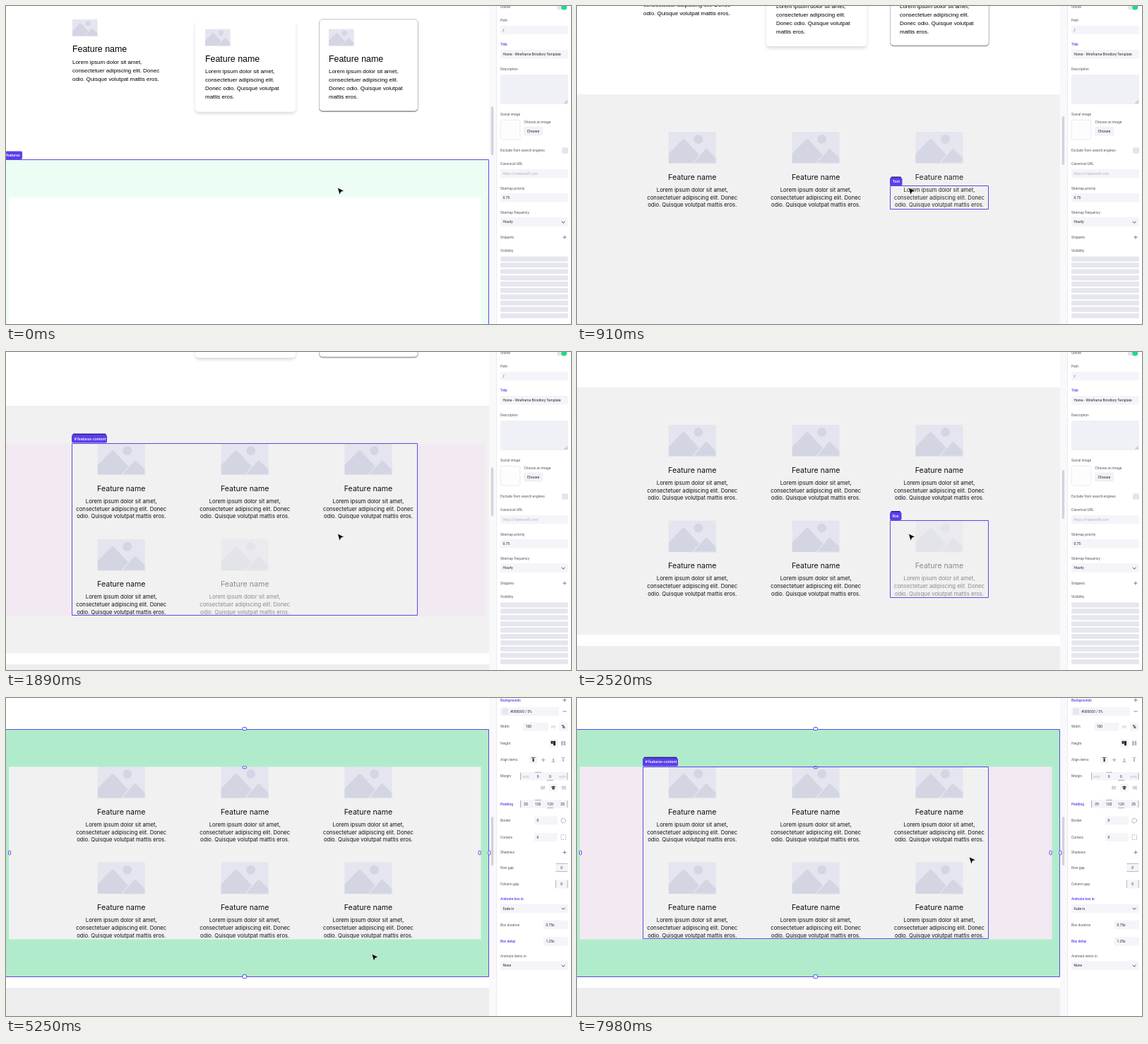
Recreate the animation shown at these times as an HTML page. Size 800 by 450 pixels, loop 8000 ms.

```html
<!DOCTYPE html>
<html lang="en">
<head>
<meta charset="utf-8">
<title>Page builder</title>
<style>
  html, body { margin: 0; width: 100%; height: 100%; overflow: hidden; background: #fff; }
  svg { display: block; width: 100vw; height: 100vh; }
  text { white-space: pre; }
  .ui { font-family: Roboto, sans-serif; }
  .card { font-family: "Liberation Sans", Arial, sans-serif; }
  .geo { font-family: Inter, sans-serif; }
</style>
</head>
<body>
<svg id="stage" viewBox="0 0 800 450" xmlns="http://www.w3.org/2000/svg"></svg>
<script>
const LOOP = 8000;
const PURPLE = '#5a3fea';
const FIELD = '#f4f4f9';
const INK = '#26262e';
const LABEL = '#565661';

const rect = (x, y, w, h, fill, extra = '') =>
  `<rect x="${x}" y="${y}" width="${w}" height="${h}" fill="${fill}" ${extra}/>`;
const line = (d, color = INK, w = 0.8) =>
  `<path d="${d}" fill="none" stroke="${color}" stroke-width="${w}"/>`;
// y is the optical middle of the line
const text = (x, y, str, size, fill, extra = '') =>
  `<text x="${x}" y="${y + size * 0.36}" font-size="${size}" fill="${fill}" ${extra}>${str}</text>`;
const MID = 'text-anchor="middle"';

// ---------- page ----------
const picture = (x, y, w) => `<g transform="translate(${x} ${y}) scale(${w / 67})">
  ${rect(0, 0, 67, 44.5, '#e4e5ee')}
  <circle cx="42" cy="10.5" r="6.4" fill="#d3d5e3"/>
  <path d="M0 31 L19.5 11 Q21.3 9.4 23.1 11 L54 44.5 H0Z" fill="#d3d5e3"/>
  <path d="M34 44.5 L51 24.6 Q53 22.6 55 24.6 L67 36.5 V44.5Z" fill="#d3d5e3" stroke="#e4e5ee" stroke-width="1.4"/>
</g>`;

const LINES = ['Lorem ipsum dolor sit amet,', 'consectetuer adipiscing elit. Donec', 'odio. Quisque volutpat mattis eros.'];
const CARD_LINES = ['Lorem ipsum dolor sit amet,', 'consectetuer adipiscing elit.', 'Donec odio. Quisque volutpat', 'mattis eros.'];

const card = (x, y, lines) => `<g class="card">${picture(x, y, 35.5)}
  ${text(x, y + 42, 'Feature name', 12.4, '#000')}
  ${lines.map((s, i) => text(x, y + 59.8 + i * 12, s, 7.97, '#000')).join('')}</g>`;

const COLS = [163.3, 338.2, 513];
const ROWS = [53, 188.6];
const ITEM_H = 109.6;

const item = i => {
  const cx = COLS[i % 3], y = ROWS[i / 3 | 0];
  return `<g id="item${i}" class="geo">${picture(cx - 33.5, y, 67)}
    ${text(cx, y + 64, 'Feature name', 10.6, '#111', MID)}
    ${LINES.map((s, k) => text(cx, y + 82 + k * 10.8, s, 7.7, '#111', MID)).join('')}</g>`;
};

const page = `<g id="page">
  ${card(94, -198.5, LINES)}
  ${rect(268, -198, 142, 130, '#fff', 'rx="5" filter="url(#soft)"')}
  ${card(282, -184.8, CARD_LINES)}
  ${rect(443.4, -198.7, 140, 129.6, '#fff', 'rx="5" stroke="#b4b4b8" stroke-width=".8" filter="url(#hard)"')}
  ${card(457, -184.8, CARD_LINES)}
  <g id="section">${rect(-7, 0, 691, 350, '#f1f1f1')}${[0, 1, 2, 3, 4, 5].map(item).join('')}</g>
  ${rect(0, 366, 684, 400, '#eeeeee')}
</g>`;

// ---------- side panels ----------
const label = (y, s, on) => text(700, y, s, 4.9, on ? PURPLE : LABEL, on ? 'font-weight="500"' : '');
const field = (x, y, w, h = 12.4, s = '', fill = INK) =>
  rect(x, y, w, h, FIELD, 'rx="1.5"') + (s ? text(x + 3.4, y + h / 2, s, 4.95, fill) : '');
const plus = y => line(`M788.4 ${y}h5.2M791 ${y - 2.6}v5.2`, '#55555f', 0.7);
const chevron = y => line(`M786.8 ${y - 1}l2.4 2.4l2.4 -2.4`, '#33333c', 0.9);

const pagePanel = `
  ${label(1.2, 'Online')}
  ${rect(780, -2.5, 14.5, 8, '#e4e4ee', 'rx="4"')}<circle cx="790.2" cy="1.6" r="4" fill="#1fdc84"/>
  ${label(20.4, 'Path')}${field(700, 28, 96, 12, '/')}
  ${label(54.7, 'Title', true)}${field(700, 62, 96, 12.4, 'Home - Wireframe Brindlory Template')}
  ${label(89, 'Description')}${rect(700, 97, 96, 42, '#f0f0f7', 'rx="1.5"')}
  ${line('M790.5 138l4.5 -4.5M793 138l2 -2', '#666', 0.6)}
  ${label(153.3, 'Social image')}
  ${rect(700.3, 161.3, 27.6, 27.6, '#fdfdfe', 'rx="2.5" stroke="#d6d6e0" stroke-width=".8" stroke-dasharray="1.5 1"')}
  ${text(733.5, 164, 'Choose an image', 4.9, LABEL)}
  ${rect(733, 170.5, 27, 13, '#f1f1f8', 'rx="2"')}${text(746.5, 177, 'Choose', 5.2, INK, MID)}
  ${label(204.4, 'Exclude from search engines')}${rect(787, 200.2, 9, 8.6, '#e4e4ee', 'rx="1.5"')}
  ${label(223.3, 'Canonical URL')}${field(700, 231, 96, 12.2, 'https://makeswift.com', '#b4b4bf')}
  ${label(257.8, 'Sitemap priority')}${field(700, 265, 96, 12.6, '0.75')}
  ${label(292, 'Sitemap frequency')}${field(700, 299.3, 96, 12.4, 'Hourly')}${chevron(305.8)}
  ${label(327, 'Snippets')}${plus(327.2)}
  ${label(346, 'Visibility')}
  ${Array.from({ length: 10 }, (_, i) => rect(700, 354.4 + i * 8.92, 96, 7, '#e6e6ee', 'rx="1.8"')).join('')}`;

const num = (x, y, s, fill = INK) => text(x, y, s, 5, fill, MID);
const sides = (y, vals) => rect(728, y - 5.8, 67.5, 11.6, FIELD, 'rx="1"') +
  vals.map((v, i) => num([736, 753.2, 770.5, 788][i], y, v, v === 'auto' ? '#b9b9c4' : INK)).join('') +
  line(`M728.6 ${y - 5}v10M749 ${y - 5.6}h9M766 ${y + 5.6}h9M795 ${y - 5}v10`, '#8a8a96', 0.7);
const aligner = (x, y, on, dy) => (on ? rect(x - 6, y - 5.5, 12, 11, FIELD, 'rx="1"') : '') +
  line(`M${x - 2.8} ${y - 3 * dy}h5.6`, on ? INK : '#a5a5b0', 0.8) +
  rect(x - 1, y - 2, 2, 4.6, on ? INK : '#b9b9c4');
const justify = (x, y, on, side) => (on ? rect(x - 6, y - 5.5, 12, 11, FIELD, 'rx="1"') : '') +
  line(`M${x + 3 * side} ${y - 3}v6`, on ? INK : '#a5a5b0', 0.8) +
  rect(x - 2.6, y - 1.8, 5.2, 1.5, on ? INK : '#b9b9c4') + rect(x - 1.8, y + 0.6, 3.6, 1.4, on ? INK : '#b9b9c4');

const boxPanel = `
  ${label(3, 'Backgrounds', true)}${plus(3)}
  ${field(700, 12.8, 83, 12.4)}${rect(702.5, 14.8, 8.6, 8.6, '#e6e6ee', 'rx="1.5"')}
  ${text(714, 19, '#000000 / 5%', 4.95, INK)}${line('M788.4 19h5.2', '#55555f', 0.7)}
  ${label(40.5, 'Width')}${field(732.4, 34.8, 35, 11.8, '100')}
  ${num(775, 40.7, 'PX', '#b4b4bf')}${rect(783, 34.8, 12.6, 11.8, FIELD, 'rx="1"')}
  ${text(789.2, 40.8, '%', 7, INK, MID + ' font-weight="700"')}
  ${label(63.8, 'Height')}${rect(769, 58, 12, 12, FIELD, 'rx="1"')}
  ${rect(771.6, 60.8, 3, 4, INK)}${rect(775, 60.8, 3, 6.4, INK)}
  ${rect(786, 60.8, 2.6, 6.4, '#b4b4bf')}${rect(789.6, 60.8, 2.6, 6.4, '#b4b4bf')}
  ${label(87.3, 'Align items')}
  ${aligner(746.6, 87.5, true, 1)}${aligner(760.8, 87.5, false, 0)}${aligner(775, 87.5, false, -1)}${aligner(789, 87.5, false, 1)}
  ${label(110.6, 'Margin')}${sides(110.8, ['auto', '0', '0', 'auto'])}
  ${justify(761, 127, false, -1)}${justify(775, 127, true, 0)}${justify(789, 127, false, 1)}
  ${label(150, 'Padding', true)}${sides(150, ['25', '120', '120', '25'])}
  ${label(173.4, 'Border')}${field(748, 167.5, 33, 11.8, '0')}
  <circle cx="789.2" cy="173.5" r="3.3" fill="none" stroke="#777782" stroke-width=".7" stroke-dasharray="2 .6"/>
  ${label(196.8, 'Corners')}${field(748, 191, 33, 11.8, '0')}
  ${rect(786, 193.8, 6.4, 6.4, 'none', 'stroke="#777782" stroke-width=".7" stroke-dasharray="1.6 1.6" stroke-dashoffset=".8"')}
  ${label(218.3, 'Shadows')}${plus(218.4)}
  ${label(239.8, 'Row gap')}${rect(778, 234, 17.5, 11.8, FIELD)}${num(786.7, 240, '0')}
  ${line('M778.5 234.3h16.5M778.5 245.6h16.5', '#8a8a96', 0.6)}
  ${label(263.4, 'Column gap')}${rect(778, 257.6, 17.5, 11.8, FIELD)}${num(786.7, 263.5, '0')}
  ${line('M778.3 258v11M795.2 258v11', '#8a8a96', 0.6)}
  ${label(284.2, 'Animate box in', true)}${field(700, 291.7, 96, 12.4, 'Fade in')}${chevron(297.9)}
  ${label(320.9, 'Box duration')}${field(761, 314.8, 35, 12.2, '0.75s')}
  ${label(344.3, 'Box delay', true)}${field(761, 338.2, 35, 12.2, '1.25s')}
  ${label(364.9, 'Animate items in')}${field(700, 372.6, 96, 12.2, 'None')}${chevron(378.8)}`;

const stage = document.getElementById('stage');
stage.innerHTML = `
  <defs>
    <filter id="soft" x="-20%" y="-20%" width="140%" height="140%"><feDropShadow dx="0" dy="3" stdDeviation="2.2" flood-opacity=".14"/></filter>
    <filter id="hard" x="-10%" y="-10%" width="120%" height="120%"><feDropShadow dx="0" dy="1" stdDeviation=".7" flood-opacity=".5"/></filter>
  </defs>
  ${rect(0, 0, 800, 450, '#fff')}
  ${page}
  <g id="overlay" class="geo"></g>
  ${rect(684, 0, 10.5, 450, '#f9f9fc')}
  ${rect(686.8, 0, 3.4, 69, '#d3d3da', 'id="thumb" rx="1.7"')}
  ${rect(694, 0, 106, 450, '#fff')}${rect(694, 0, 0.9, 450, '#e8e8ef')}
  <g id="pagePanel" class="ui">${pagePanel}</g>
  <g id="boxPanel" class="ui">${boxPanel}</g>
  <g id="edge"></g>
  <g id="cursor">
    <path id="canvasArrow" d="M0 0L9 4.2L4.8 5.6L3 10Z" fill="#000" stroke="#fff" stroke-width=".5"/>
    <path id="panelArrow" d="M0 0V7.2L1.6 5.8L2.8 8.4L4 7.9L2.9 5.3H5.1Z" fill="#000" stroke="#fff" stroke-width=".3"/>
  </g>`;
const $ = id => document.getElementById(id);

// ---------- motion ----------
const clamp = v => Math.max(0, Math.min(1, v));
const smooth = v => v * v * (3 - 2 * v);

function track(keys, t, ease) {
  let i = 0;
  while (i < keys.length - 2 && t >= keys[i + 1][0]) i++;
  const [a, b] = [keys[i], keys[i + 1]];
  const k = ease(clamp((t - a[0]) / (b[0] - a[0])));
  return a.slice(1).map((v, n) => v + (b[n + 1] - v) * k);
}

const SCROLL = [[0, 217.6], [450, 164], [910, 125], [1540, 93], [2100, 66], [2520, 50], [2800, 45], [3150, 44], [LOOP, 44]];
const POINTER = [
  [0, 469.5, 257.3], [3700, 469.5, 257.3], [3860, 494.7, 258], [4540, 494.7, 258],
  [4900, 500, 365], [5150, 500, 365], [5750, 738, 330], [6230, 738, 330],
  [6500, 730.8, 343], [6650, 730.8, 343], [7400, 630, 225], [7480, 630, 225],
  [7780, 555.3, 225], [LOOP, 555.3, 225]
];
const SELECT_AT = 5000;

const SECTION = [-7, 0, 690, 350];
const INNER = [4, 53.3, 668.5, 244.3];
const MARGINS = [0, 53.3, 678.5, 244.3];

// What lies under the pointer, in section coordinates
function hit(x, y) {
  if (x > 683 || y < 0 || y > 350) return null;
  if (x < 93 || x > 583 || y < 53 || y > 298) return { name: 'section', tag: '# features', w: 31, box: SECTION };
  const content = { name: 'content', tag: '# features-content', w: 50, box: [93, 53, 489, 243.5] };
  const cx = COLS.find(c => Math.abs(x - c) < 70);
  const top = ROWS.find(r => y >= r && y < r + ITEM_H);
  if (cx === undefined || top === undefined) return content;
  const q = y - top, left = cx - 70;
  if (q < 44.5 && Math.abs(x - cx) < 33.5) return { name: 'image', tag: 'Image', w: 21.5, box: [cx - 33.5, top, 67, 44.5], margin: [left, top, 140, 57] };
  if (q > 57 && q < 72.5) return { name: 'text', tag: 'Text', w: 17.5, box: [left, top + 57, 139.5, 15.5] };
  if (q > 77) return { name: 'text', tag: 'Text', w: 17.5, box: [left, top + 77, 139.5, 32.3] };
  return { name: 'box', tag: 'Box', w: 16.5, box: [left, top, 139.5, ITEM_H - 0.6] };
}

const area = ([x, y, w, h]) => `M${x} ${y}h${w}v${h}h${-w}Z`;
const ring = (outer, inner, fill) => `<path fill-rule="evenodd" fill="${fill}" d="${area(outer)}${area(inner)}"/>`;
const green = a => ring(SECTION, INNER, `rgba(52,226,132,${a})`);
const handle = (x, y, w, h) => rect(x - w / 2, y - h / 2, w, h, '#fff', `rx="1.2" stroke="${PURPLE}" stroke-width="1"`);

// One pixel line on whole screen pixels
function outline([x, y, w, h], top) {
  const px = v => Math.floor(v) + 0.5;
  const x0 = px(x), y0 = px(y + top) - top;
  return line(area([x0, y0, px(x + w) - x0, px(y + h + top) - top - y0]), '#5b4be2', 1);
}

function tag(h) {
  const x = h.box[0] - (h.name === 'section' ? 1 : 0), y = h.box[1] - 12;
  return (h.name === 'section' ? '' : rect(x + 1.5, y - 1.5, h.w - 3, 5, '#2c1d8f', 'rx="1.2"')) +
    rect(x, y, h.w, 11.4, PURPLE, 'rx="2"') +
    text(x + 3.7, y + 5.7, h.tag, 4.9, '#fff', 'font-weight="600"');
}

function overlay(h, selected, top) {
  let s = '';
  if (selected) s += green(0.34) + outline(SECTION, top);
  if (h && h.name === 'section' && !selected) s += green(0.09);
  const pink = 'rgba(255,80,255,.05)';
  if (h && h.name === 'content') s += ring(selected ? INNER : MARGINS, h.box, pink);
  if (h && h.margin) s += ring(h.margin, h.box, pink);
  if (selected) s += handle(337.8, -0.5, 5.6, 4) + handle(337.8, 54.3, 5.6, 3) + handle(337.8, 350.2, 5.6, 5) +
    handle(5, 175, 3, 5.6) + handle(670.6, 175, 3, 5.6);
  if (h && !(selected && h.name === 'section')) s += outline(h.box, top) + tag(h);
  return s;
}

function render(t) {
  const [top] = track(SCROLL, t, v => v);
  const [px, py] = track(POINTER, t, smooth);
  const selected = t >= SELECT_AT;
  const shift = `translate(0 ${top})`;

  $('page').setAttribute('transform', shift);
  $('section').setAttribute('opacity', clamp((t - 70) / 730));
  for (let i = 0; i < 6; i++) $('item' + i).setAttribute('opacity', clamp((t + 910 - i * 630) / 620));

  $('overlay').setAttribute('transform', shift);
  $('overlay').innerHTML = overlay(hit(px, py - top), selected, top);
  $('edge').innerHTML = selected ? handle(684.3, top + 175, 3, 5.6) : '';
  $('thumb').setAttribute('y', 142 + (218 - top) * 0.15);

  $('pagePanel').setAttribute('display', selected ? 'none' : 'inline');
  $('boxPanel').setAttribute('display', selected ? 'inline' : 'none');
  $('cursor').setAttribute('transform', `translate(${px.toFixed(2)} ${py.toFixed(2)})`);
  $('canvasArrow').setAttribute('display', px < 684 ? 'inline' : 'none');
  $('panelArrow').setAttribute('display', px < 684 ? 'none' : 'inline');
}

const start = performance.now();
function tick() {
  render((performance.now() - start) % LOOP);
  requestAnimationFrame(tick);
}
render(0);
requestAnimationFrame(tick);
</script>
</body>
</html>
```
